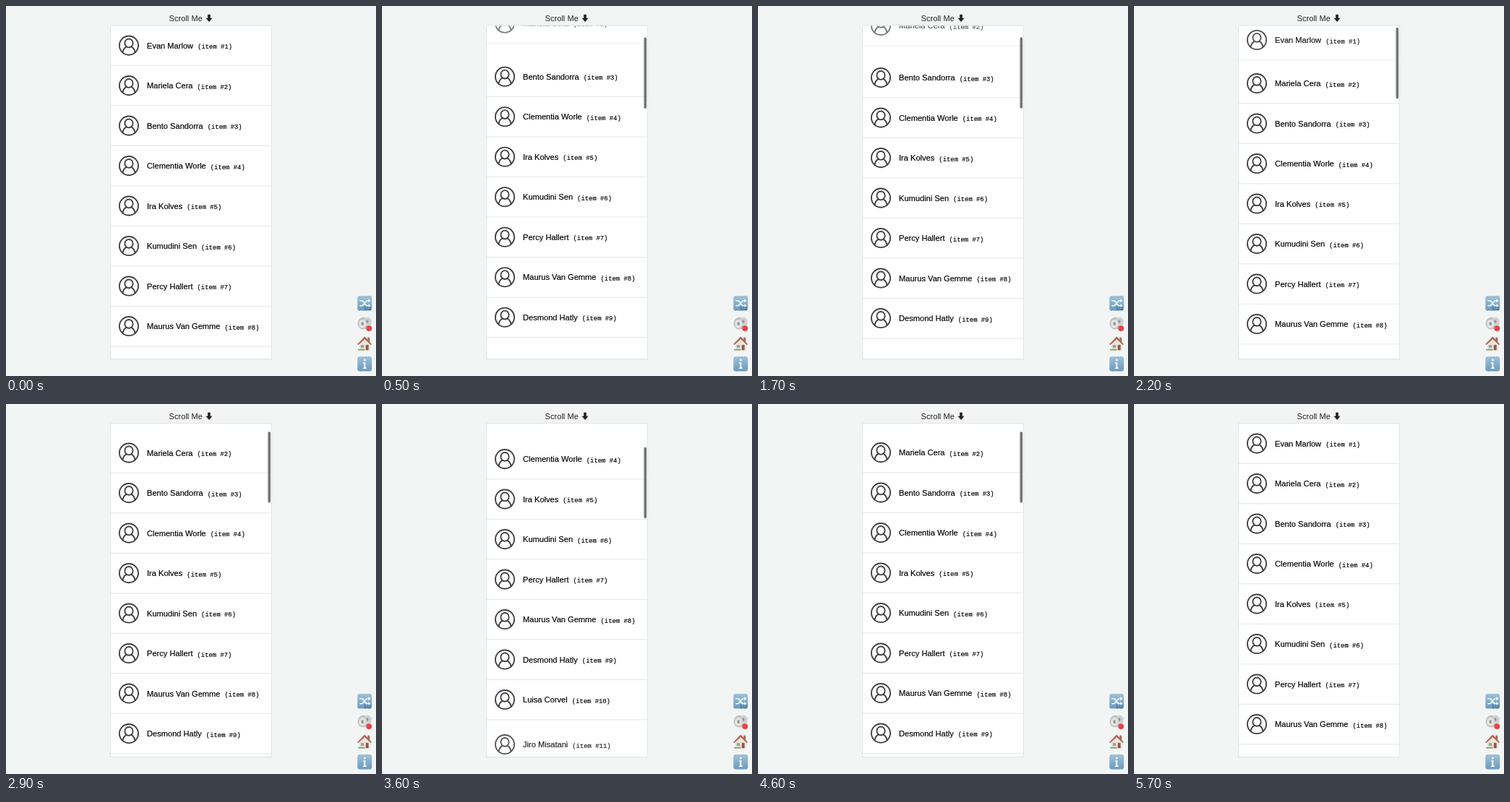
Animation, 512 px wide and 512 px high, one loop 5.8 s. Source, as an HTML page:

```html
<!DOCTYPE html>
<html lang="en">
<head>
<meta charset="utf-8">
<title>Scroll list</title>
<style>
  html, body { margin: 0; width: 100%; height: 100%; overflow: hidden; background: #f3f5f5; }
  svg { display: block; width: 100vw; height: 100vh; }
  text { font-family: "Liberation Sans", Arial, sans-serif; font-size: 11.1px; }
  .name { fill: #000; stroke: #000; stroke-width: .18px; }
  .num { font-family: "Liberation Mono", "Courier New", monospace; font-size: 8.88px; }
  .avatar { fill: none; stroke: #414145; stroke-width: 1.85px; stroke-linecap: round; }
</style>
</head>
<body>
<svg viewBox="0 0 512 512" xmlns="http://www.w3.org/2000/svg">
  <defs>
    <clipPath id="port"><rect x="145" y="27.4" width="222" height="460.8"/></clipPath>
    <linearGradient id="tile" x1="0" y1="0" x2="0" y2="1">
      <stop offset="0" stop-color="#a0c2d8"/><stop offset="1" stop-color="#6b9bbd"/>
    </linearGradient>
    <g id="face" class="avatar">
      <circle r="13.1"/>
      <ellipse cy="-3.2" rx="5.6" ry="5.9"/>
      <path d="M-8.5 9.7C-8 5.8-6.3 3.5-3.4 1.8M8.5 9.7C8 5.8 6.3 3.5 3.4 1.8"/>
    </g>
  </defs>

  <rect width="512" height="512" fill="#f3f5f5"/>
  <text x="225.6" y="20.6" fill="#222">Scroll Me</text>
  <path d="M279.2 11.8h3.6v5h2.7l-4.5 5.2-4.5-5.2h2.7z" fill="#222"/>

  <rect x="144.6" y="26.9" width="222.8" height="461.6" fill="#fff" stroke="#dde1e1" stroke-width=".9"/>
  <g id="list" clip-path="url(#port)"></g>
  <rect id="thumb" x="362.5" width="3.6" height="98.5" rx="1.8" fill="#747474"/>

  <!-- shuffle -->
  <g transform="translate(496.3 411.3)">
    <rect x="-10" y="-10.3" width="20" height="20.6" rx="3.2" fill="url(#tile)"/>
    <path d="M-7-3.6h2.8C-.8-3.6.4 3.4 3.8 3.4h2M-7 3.4h2.8C-.8 3.4.4-3.6 3.8-3.6h2" fill="none" stroke="#f4f8fa" stroke-width="1.6"/>
    <path d="M5-6.4l3.4 2.8L5-.8zM5 .6l3.4 2.8L5 6.2z" fill="#f4f8fa"/>
    <text x="-1.5" y="9.4" fill="#2f6f9f" style="font-size:7.5px;font-weight:bold">1/2</text>
  </g>

  <!-- grey reels with a red dot -->
  <g transform="translate(496.3 439.7)">
    <ellipse cx="-2" cy="-.5" rx="7.6" ry="8.4" fill="#bfc2c2"/>
    <ellipse cx="4" cy="-2.5" rx="5.6" ry="6.6" fill="#cfd1d1"/>
    <ellipse cx="-3" cy="0" rx="4.8" ry="6" fill="#e2e4e4"/>
    <ellipse cx="-3" cy="0" rx="1.8" ry="2.4" fill="#929696"/>
    <ellipse cx="3.8" cy="-3.2" rx="1.6" ry="2.2" fill="#959999"/>
    <circle cx="6" cy="6.4" r="3.9" fill="#ec4048"/>
  </g>

  <!-- house -->
  <g transform="translate(496.3 467.3)">
    <rect x="4" y="-8.6" width="3" height="6" fill="#a4695a"/>
    <path d="M-7.4-.6L0-7.6 7.4-.6V9H-7.4z" fill="#ece4d9"/>
    <path d="M-10 .6L0-9.8 10 .6 8.6 1.8 0-6.4-8.6 1.8z" fill="#b0614f"/>
    <rect x="-5.4" y="1.8" width="4.4" height="3.8" fill="#8aa6b4"/>
    <rect x="1.6" y="1.6" width="3.8" height="7.4" fill="#8f5a45"/>
    <path d="M-9 7.4h9.4v2H-9z" fill="#8aa668"/>
  </g>

  <!-- info -->
  <g transform="translate(496.3 495.2)">
    <rect x="-10" y="-10.3" width="20" height="20.6" rx="3.2" fill="url(#tile)"/>
    <circle cy="-5.2" r="1.5" fill="#fff"/>
    <path d="M-2.2-2h3.3v7.4h1.5v1.4h-5V5.4h1.5V-.6h-1.3z" fill="#fff"/>
  </g>
</svg>

<script>
const LOOP = 5800, STEP = 100;
const ROW = 55.5, TOP = 27.3, BOTTOM = 488.5, PUSH = 1.5;
const names = ["Evan Marlow", "Mariela Cera", "Bento Sandorra", "Clementia Worle",
  "Ira Kolves", "Kumudini Sen", "Percy Hallert", "Maurus Van Gemme",
  "Desmond Hatly", "Luisa Corvel", "Jiro Misatani", "Lena Orvik"];

// [time, scroll offset]
const keys = [[0, 0], [100, 0], [900, 152], [1150, 165], [1700, 66.5], [2300, 0], [2600, 0],
  [2900, 42.5], [3600, 145], [3800, 152], [3900, 152], [4600, 43], [5000, 0], [LOOP, 0]];

const clamp = (v, a = 0, b = 1) => Math.min(b, Math.max(a, v));
const rate = i => (keys[i + 1][1] - keys[i][1]) / (keys[i + 1][0] - keys[i][0]);

function slope(i) {
  if (i === 0 || i === keys.length - 1) return 0;
  const a = rate(i - 1), b = rate(i);
  return a * b > 0 ? 2 * a * b / (a + b) : 0;
}

// Monotone cubic between the keys
function scrollAt(t) {
  let i = 0;
  while (i < keys.length - 2 && t >= keys[i + 1][0]) i++;
  const [t0, a] = keys[i], [t1, b] = keys[i + 1];
  const h = t1 - t0, u = (t - t0) / h, v = 1 - u;
  return a * (1 + 2 * u) * v * v + b * u * u * (3 - 2 * u)
    + h * u * v * (slope(i) * v - slope(i + 1) * u);
}

function barAlpha(t) {
  if (t < 200) return 0;
  return clamp((5700 - t) / 300);
}

const list = document.getElementById("list");
const thumb = document.getElementById("thumb");
list.innerHTML = names.map((name, i) => `<g>
  <use href="#face" x="170" y="27.3"/>
  <text class="name" x="195" y="31.4">${name}<tspan class="num" dx="6" dy=".6">(item #${i + 1})</tspan></text>
  <path d="M145 55.1h222" stroke="#e4e7e7" stroke-width="1"/>
</g>`).join("");
const rows = [...list.children];

function draw(t) {
  const scroll = scrollAt(t);
  rows.forEach((row, i) => {
    const y = TOP + i * ROW - scroll;
    const leave = clamp((TOP - y) / ROW);
    const enter = clamp((y + ROW - BOTTOM) / ROW);
    const shift = (enter - leave) * PUSH * ROW;
    row.setAttribute("transform", `translate(0 ${(y + shift).toFixed(2)})`);
    row.setAttribute("opacity", clamp(1 - PUSH * (enter + leave)));
  });
  thumb.setAttribute("y", 29.2 + scroll * 0.2107);
  thumb.setAttribute("opacity", barAlpha(t));
}

const start = performance.now();
function tick() {
  const t = (performance.now() - start) % LOOP;
  draw(Math.floor(t / STEP) * STEP);
  requestAnimationFrame(tick);
}
draw(0);
requestAnimationFrame(tick);
</script>
</body>
</html>
```
